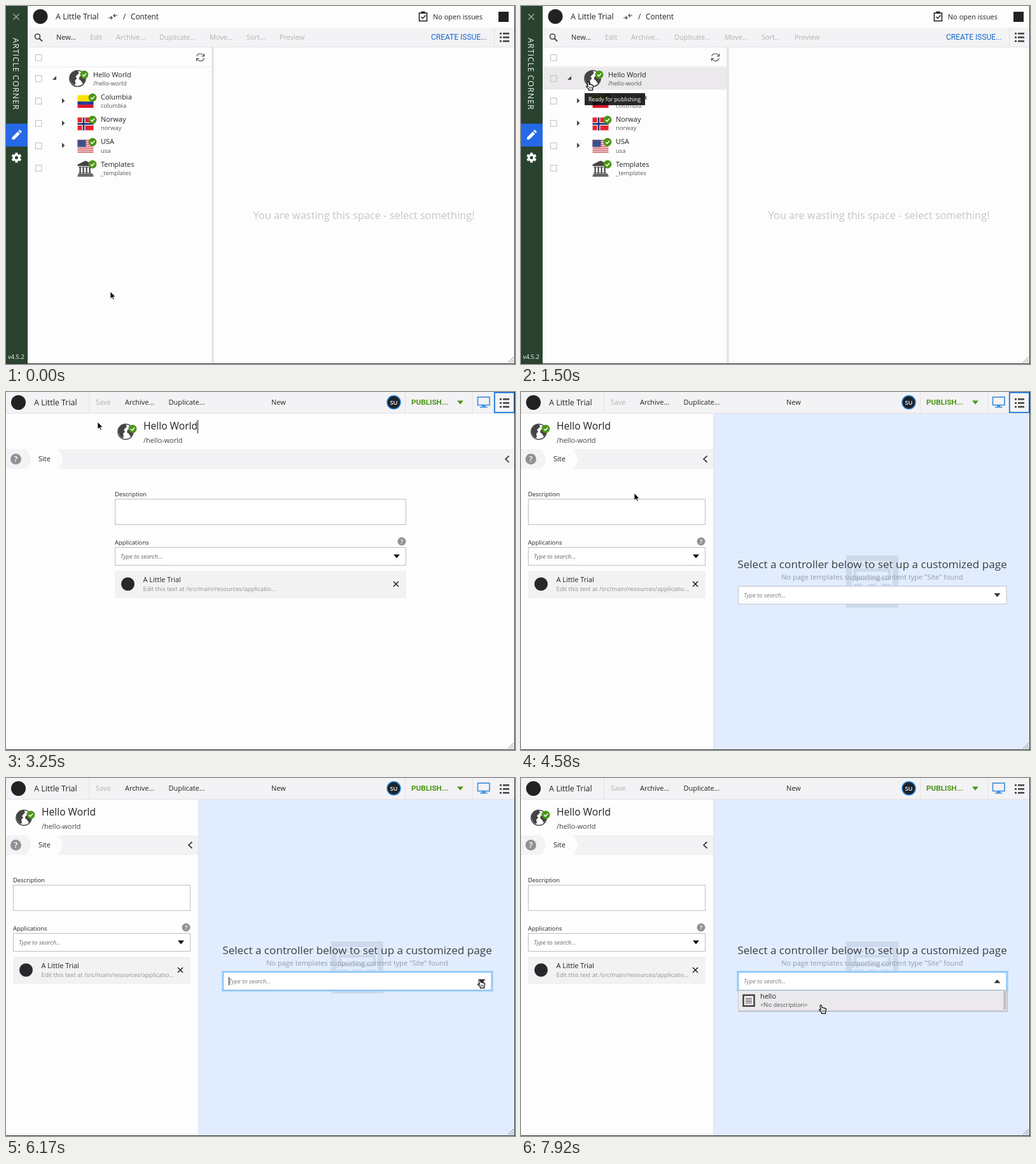
Animation of 800 by 563 pixels, one loop 8 s. Source, as an HTML page:

```html
<!DOCTYPE html>
<html lang="en">
<head>
<meta charset="utf-8">
<title>Content editor walkthrough</title>
<style>
html, body { margin: 0; width: 100%; height: 100%; overflow: hidden; background: #fefdfe; }
svg { display: block; width: 100%; height: 100%; font-family: "Open Sans", sans-serif; cursor: default; }
text { white-space: pre; }
</style>
</head>
<body>
<svg id="stage" viewBox="0 0 800 563"></svg>
<script>
const LOOP = 8000;
const SITE = 'A Little Trial';
const INK = '#222', GREY = '#b3b1b3', DARK = '#444', GREEN = '#4a9615', BLUE = '#1b75d8', BAR = '#f3f2f4';
const AT = { tooltip: 1350, select: 1950, preview: 2100, edit: 2850, wizard: 3080, pageEditor: 4150, focus: 5880, open: 6600 };
const stage = document.getElementById('stage');

const rect = (x, y, w, h, fill, extra = '') =>
  `<rect x="${x}" y="${y}" width="${w}" height="${h}" fill="${fill}" ${extra}/>`;
const box = (x, y, w, h, stroke, fill = '#fff', width = 1) =>
  rect(x, y, w, h, fill, `stroke="${stroke}" stroke-width="${width}"`);
const disc = (x, y, r, fill, extra = '') => `<circle cx="${x}" cy="${y}" r="${r}" fill="${fill}" ${extra}/>`;
const shape = (d, fill) => `<path d="${d}" fill="${fill}"/>`;
const line = (d, stroke, width = 1, extra = '') =>
  `<path d="${d}" fill="none" stroke="${stroke}" stroke-width="${width}" ${extra}/>`;
const text = (x, y, s, size = 10.95, fill = INK, extra = '') =>
  `<text x="${x}" y="${y}" font-size="${size}" fill="${fill}" ${extra}>${s.replace(/</g, '&lt;')}</text>`;
const group = (x, y, body, more = '') => `<g transform="translate(${x} ${y}) ${more}">${body}</g>`;
const MIDDLE = 'text-anchor="middle"';
const ITALIC = 'font-style="italic"';
const ROBOTO = 'font-family="Roboto, sans-serif"';

// Pointer tip: time, x, y
const path = [
  [0, 164, 449], [80, 164, 449], [240, 159, 330], [500, 145, 164], [830, 109, 121], [1500, 105, 119],
  [2330, 105, 119], [2800, 144, 47], [3920, 144, 47], [4400, 178, 159], [4670, 178, 159],
  [5000, 400, 290], [5250, 640, 366], [5500, 744, 330], [5700, 744, 317], [6700, 744, 317],
  [7170, 640, 352], [7800, 471, 357], [LOOP, 471, 357]
];
function pointerAt(t) {
  const i = path.findIndex(p => p[0] > t);
  const [t0, x0, y0] = path[i - 1], [t1, x1, y1] = path[i];
  const k = (t - t0) / (t1 - t0);
  return { x: x0 + (x1 - x0) * k, y: y0 + (y1 - y0) * k };
}

const pointers = {
  arrow: '<path d="M0 0V11.5L2.7 9 4.5 13 6.3 12.2 4.5 8.4H8Z" stroke="#fff" stroke-width=".8"/>',
  hand: '<path d="M-1 .8Q0-.8 1.2.6L2.2 4.5 3.6 4 4.8 4.9 6.2 4.6 7 5.6 8.2 5.6 8.6 8 7.6 11V13.4H1.6V12L-2.4 7.8Q-2.6 6.4-1.2 6.8L.3 7.8Z" fill="#fff" stroke="#000" stroke-width="1.1"/><path d="M2.6 8v3M4.4 8v3M6.2 8v3" stroke="#000" stroke-width=".7"/>',
  beam: line('M-2.5-5.5Q0-5.5 0-4 0-5.5 2.5-5.5M0-4V5M-2.5 6.5Q0 6.5 0 5 0 6.5 2.5 6.5M-1.5 2h3', '#222')
};

const badge = (x, y) => disc(x, y, 6.4, GREEN) + line(`M${x - 3} ${y}l2.2 2.3 4-4.4`, '#fff', 1.5);
const caretDown = (x, y, fill) => shape(`M${x - 5} ${y - 3}h10l-5 6z`, fill);
const globe = (x, y, r) => group(x, y,
  disc(0, 0, 12, '#fdfdfd', `stroke="${DARK}" stroke-width="1.6"`) +
  shape('M-11-5Q-7-12 0-12L2-8-1-5-3-3-1 0-4 3-3 8-5 10Q-13 5-11-5ZM4-8 9-7Q13-1 11 4L8 8 5 3 2 1 3-3 6-4Z', DARK),
  `scale(${r / 12})`);
const listIcon = (x, y) => [0, 6, 12].map(d => rect(x, y + d, 3, 2.6, DARK) + rect(x + 5, y + d, 10, 2.6, DARK)).join('');
const publish = (x, y) => text(x, y, 'PUBLISH...', 11.7, GREEN, ROBOTO + ' font-weight="600"');
const frameEdge = () => rect(799, 0, 1, 563, '#333') + rect(0, 562, 800, 1, '#333') +
  line('M789 561l9-9M793 561l5-5M796.5 561l1.5-1.5', '#888');

const flags = {
  columbia: rect(0, 0, 25, 10, '#ffe000') + rect(0, 10, 25, 5, '#17309c') + rect(0, 15, 25, 5, '#df1322') +
    line('M6 12.5h14', '#e8c200', 1, 'stroke-dasharray="1 2"'),
  norway: rect(0, 0, 25, 20, '#e5242f') + line('M9.5 0v20M0 10h25', '#fff', 5) + line('M9.5 0v20M0 10h25', '#1b3474', 2.6),
  usa: rect(0, 0, 25, 20, '#fff') + [0, 1, 2, 3, 4, 5, 6].map(i => rect(0, i * 3.05, 25, 1.6, '#cf4450')).join('') +
    rect(0, 0, 13, 11, '#2b3f7c') + [2, 4.5, 7, 9.3].map(y => line(`M1.5 ${y}h11`, '#aeb8d6', .8, 'stroke-dasharray="1 1.4"')).join(''),
  _templates: shape('M12.5-2.5 25 3.5V6H0V3.5ZM1 18h23v2H1zM0 20.5h25v2H0z', DARK) +
    [3, 8, 13, 18].map(x => rect(x, 7.5, 2.2, 9, DARK) + rect(x - 1, 7, 4.2, 1.4, DARK) + rect(x - 1, 16, 4.2, 1.4, DARK)).join('')
};
const children = ['Columbia', 'Norway', 'USA', 'Templates'];
const rowTop = i => 96.5 + i * 35.2;

function sidebar() {
  return rect(0, 0, 34, 563, '#29432f') + line('M11.5 12.5l9 9m0-9l-9 9', '#a5b1a9', 1.4) +
    group(10.5, 50, text(0, 0, 'ARTICLE CORNER', 12.6, '#f2f5f3', 'letter-spacing=".95"'), 'rotate(90)') +
    rect(0, 185, 34, 36, '#2569e6') +
    shape('M9.5 206.5 18.5 197.5 22 201 13 210H9.5ZM19.5 196.5l2-2 3.5 3.5-2 2Z', '#fff') +
    group(16.5, 238.5, disc(0, 0, 4.2, 'none', 'stroke="#fff" stroke-width="3.4"') +
      [0, 60, 120, 180, 240, 300].map(a => `<rect x="-2" y="-7.8" width="4" height="3.6" fill="#fff" transform="rotate(${a})"/>`).join('')) +
    text(3, 555, 'v4.5.2', 9.4, '#fff');
}

function treeRow(i, hovered, selected) {
  const y = rowTop(i), root = i === 0, x = root ? 137 : 149;
  const name = root ? 'Hello World' : children[i - 1];
  const sub = root ? '/hello-world' : i === 4 ? '_templates' : name.toLowerCase();
  let s = selected ? rect(34, y, 289, 35, '#3a87d9') : hovered ? rect(34, y, 289, 35, '#ebe9eb') : '';
  s += box(46.5, y + 13, 9.5, 9.5, selected ? '#fff' : '#bdbdbd', selected ? '#fff' : 'none');
  if (root) s += shape('M79 110v6h-6z', DARK) + globe(112.5, 114, 12.5) + badge(123, 108);
  else {
    if (i < 4) s += shape(`M88 ${y + 13}v8.5l4.3-4.25z`, DARK);
    s += group(112.5, y + 8.5, flags[sub]) + badge(136, Math.round(y + 12));
  }
  return s + text(x, y + 15.3, name, 10.95, selected ? '#fff' : INK) +
    text(x, y + 28.5, sub, 9.35, selected ? '#fff' : '#555');
}

function browse(t, pointer) {
  const selected = t >= AT.select, ready = t >= AT.preview;
  const hover = Math.floor((pointer.y + 4 - rowTop(0)) / 35.2);
  const tools = [[79, 'New...', 1], [132, 'Edit', ready], [173, 'Archive...', ready], [241, 'Duplicate...', ready],
    [320, 'Move...', 0], [378, 'Sort...', ready], [430, 'Preview', 0]];
  let s = disc(54, 16.5, 11.5, INK) + text(78, 21.3, SITE, 12.5) +
    line('M161 18.5h6m-2.5-2.5 2.5 2.5-2.5 2.5M175 15h-6m2.5-2.5-2.5 2.5 2.5 2.5', DARK, 1.2) +
    text(184, 21, '/', 12) + text(196, 21, 'Content', 11.8) +
    box(649.5, 11, 12, 12.5, INK, 'none', 1.6) + rect(652.5, 8.5, 6, 3.5, INK) + line('M652.5 17l2.5 2.5 4.5-5', INK, 1.5) +
    text(671, 20.5, 'No open issues') + rect(774, 9, 16, 16, INK);
  s += rect(34, 34, 766, 31, BAR) + line('M34 64.5H800M767.5 34v30', '#e2e0e2') +
    disc(49.5, 48, 4, 'none', `stroke="${DARK}" stroke-width="1.7"`) + line('M52.5 51l4.5 4.5', DARK, 2);
  if (t >= AT.edit) s += box(122, 35, 39.5, 28.5, BLUE, '#f4f4f5', 1.8);
  s += tools.map(([x, label, on]) => text(x, 53, label, 10.95, on ? INK : GREY)).join('');
  s += ready ? publish(675, 52.5) + caretDown(751, 49, GREEN)
    : text(668, 52.5, 'CREATE ISSUE...', 12, '#1768d0', ROBOTO);
  s += listIcon(776, 42) + box(46.5, 76.5, 9.5, 9.5, '#bdbdbd', 'none') +
    line('M299.7 79Q301 75 305.5 75 309 75 311 78.5M311.5 75v4h-4M311.3 82Q310 86.5 305.5 86.5 302 86.5 300 83M299.5 86.5v-4h4', DARK, 1.1) +
    line('M34 95.5H323', '#e9e7e9');
  for (let i = 0; i < 5; i++) s += treeRow(i, i === hover, i === 0 && selected);
  s += rect(323, 65, 4, 498, '#e7e5e8');
  s += ready
    ? text(330, 84.5, 'New', 9.4) + line('M327 95.5H800', '#efedef') +
      text(563, 323.5, 'Unable to render', 16.4, '#c6c4c7', MIDDLE) +
      text(563, 347, 'No template or page configured', 16.4, '#c6c4c7', MIDDLE)
    : text(562.5, 335.3, 'You are wasting this space - select something!', 16.4, '#c6c4c7', MIDDLE);
  if (t >= AT.tooltip && t < AT.select)
    s += rect(100, 137, 95, 19, '#111', 'opacity=".9"') + text(106, 149.7, 'Ready for publishing', 8.6, '#fff');
  return s + sidebar();
}

const help = (x, y, r) => disc(x, y, r, '#919093') +
  text(x, y + r * .55, '?', r * 1.5, '#fff', MIDDLE + ' font-weight="600"');

function wizardForm(split) {
  const shift = split ? 0 : 160, width = split ? 279 : 458, end = 11 + width;
  const header = globe(28, 62.5, 12) + badge(39, 58) + text(56, 59.3, 'Hello World', 15.6) + text(56, 80.3, '/hello-world', 10.95, DARK);
  const fields = text(11, 164, 'Description', 9.4) + box(11.5, 168.5, width - 1, 40, '#bfbdbf') +
    text(11, 240, 'Applications', 9.4) + help(end - 7, 235, 6.5) +
    box(11.5, 244.5, width - 1, 28, '#bfbdbf') + text(20, 262, 'Type to search...', 9.4, '#666', ITALIC) + caretDown(end - 15, 258.5, '#111') +
    rect(11, 281, width, 43, '#f3f2f3') + disc(31.5, 302, 10.5, '#26282c') +
    text(55.5, 299.3, SITE) + text(55.5, 312.8, 'Edit this text at /src/main/resources/applicatio...', 9.4, '#8f8d90') +
    line(`M${end - 20} 298l8 8m0-8l-8 8`, INK, 1.6);
  const strip = rect(0, 90, split ? 302 : 800, 31, BAR) + shape('M32 90h50l8 15.5-8 15.5H32l8-15.5z', '#fefdfe') +
    help(15.5, 105.5, 8.5) + text(51, 109.3, 'Site') + line(`M${split ? 292.5 : 790.5} 100.5l-5.5 5 5.5 5`, DARK, 1.8);
  return strip + group(shift, 0, header + fields);
}

function pageEditor(t) {
  const focused = t >= AT.focus, open = t >= AT.open;
  let s = rect(302, 34, 498, 529, '#e1edfe') + line('M302.5 34V562', '#dce4ef');
  s += box(515.5, 261.5, 73, 73, '#cddaeb', 'none', 9) + box(525, 280, 54, 14, '#cddaeb', 'none', 5) +
    line('M523 272.5h59', '#cddaeb', 4, 'stroke-dasharray="6 4"') + line('M523 305h59', '#cddaeb', 7, 'stroke-dasharray="14 8"');
  s += text(552, 276.7, 'Select a controller below to set up a customized page', 17.15, '#3b3e45', MIDDLE) +
    text(552, 295.3, 'No page templates supporting content type "Site" found', 10.95, '#929aa5', MIDDLE);
  if (focused) s += box(341, 305, 423, 29, '#a9d5fc', 'none', 4);
  s += box(341.5, 305.5, 421.5, 28, focused ? '#64b2f3' : '#bfc5cd') + text(350, 323.3, 'Type to search...', 9.4, '#777', ITALIC);
  s += open ? shape('M743.5 322.5h10l-5-5.5z', '#333') : caretDown(748.5, 319.5, '#333');
  if (focused && Math.floor((t - AT.focus) / 530) % 2 === 0) s += rect(350, 313, 1, 13, '#111');
  if (open) s += rect(342, 335, 423, 33, '#9aa6b5', 'opacity=".55"') + box(341.5, 334, 422, 32, '#c8c6ca', '#ebe9ec') +
    rect(758.5, 335, 3.5, 29, '#bcbabd') + box(349.5, 341.5, 17, 17, DARK, '#f5f5f5', 2.6) +
    line('M353 346.5h10M353 349h10M353 351.5h10M353 354h10', DARK, 1.1) +
    text(376, 347.3, 'hello') + text(376, 359.8, '<No description>', 9.35, '#555');
  return s;
}

function wizard(t) {
  const split = t >= AT.pageEditor;
  let s = wizardForm(split);
  if (split) s += pageEditor(t);
  else if (Math.floor((t - AT.wizard) / 530) % 2 === 0) s += rect(301, 44, 1, 21, '#111');
  s += rect(0, 0, 800, 33, BAR) + line('M0 33.5H800M130.5 0v33M627.5 0v33M733.5 0v33', '#e3e1e4') +
    disc(19.5, 16.5, 11.5, INK) + text(44, 21.2, SITE, 12.5) +
    text(141, 20.3, 'Save', 10.95, GREY) + text(187, 20.3, 'Archive...') + text(255.5, 20.3, 'Duplicate...') + text(417, 20.3, 'New') +
    disc(609.5, 16.3, 10.5, '#1d232b', 'stroke="#2b84d4" stroke-width="1.5"') + text(609.5, 20, 'SU', 9.4, '#fff', MIDDLE + ' font-weight="600"') +
    publish(637, 20) + caretDown(714, 16.5, GREEN) +
    box(741.5, 8, 18.5, 12.5, '#4091df', 'none', 1.7) + rect(748, 21, 5.5, 2.5, '#4091df') + rect(745, 23, 11.5, 1.6, '#4091df');
  if (t < AT.focus) s += box(767.8, .9, 31, 31.3, BLUE, '#f4f4f5', 1.8);
  return s + listIcon(776, 10);
}

function pointerKind(t, p) {
  if (t >= AT.wizard) return t > 5450 ? 'hand' : 'arrow';
  if (p.y < 64) return 'beam';
  return p.y > 97 && p.y < 273 ? 'hand' : 'arrow';
}

function draw(now) {
  const t = now % LOOP, p = pointerAt(t);
  stage.innerHTML = rect(0, 0, 800, 563, '#fefdfe') + (t < AT.wizard ? browse(t, p) : wizard(t)) +
    frameEdge() + group(p.x, p.y, pointers[pointerKind(t, p)]);
  requestAnimationFrame(() => draw(performance.now() - start));
}
const start = performance.now();
draw(0);
</script>
</body>
</html>
```
